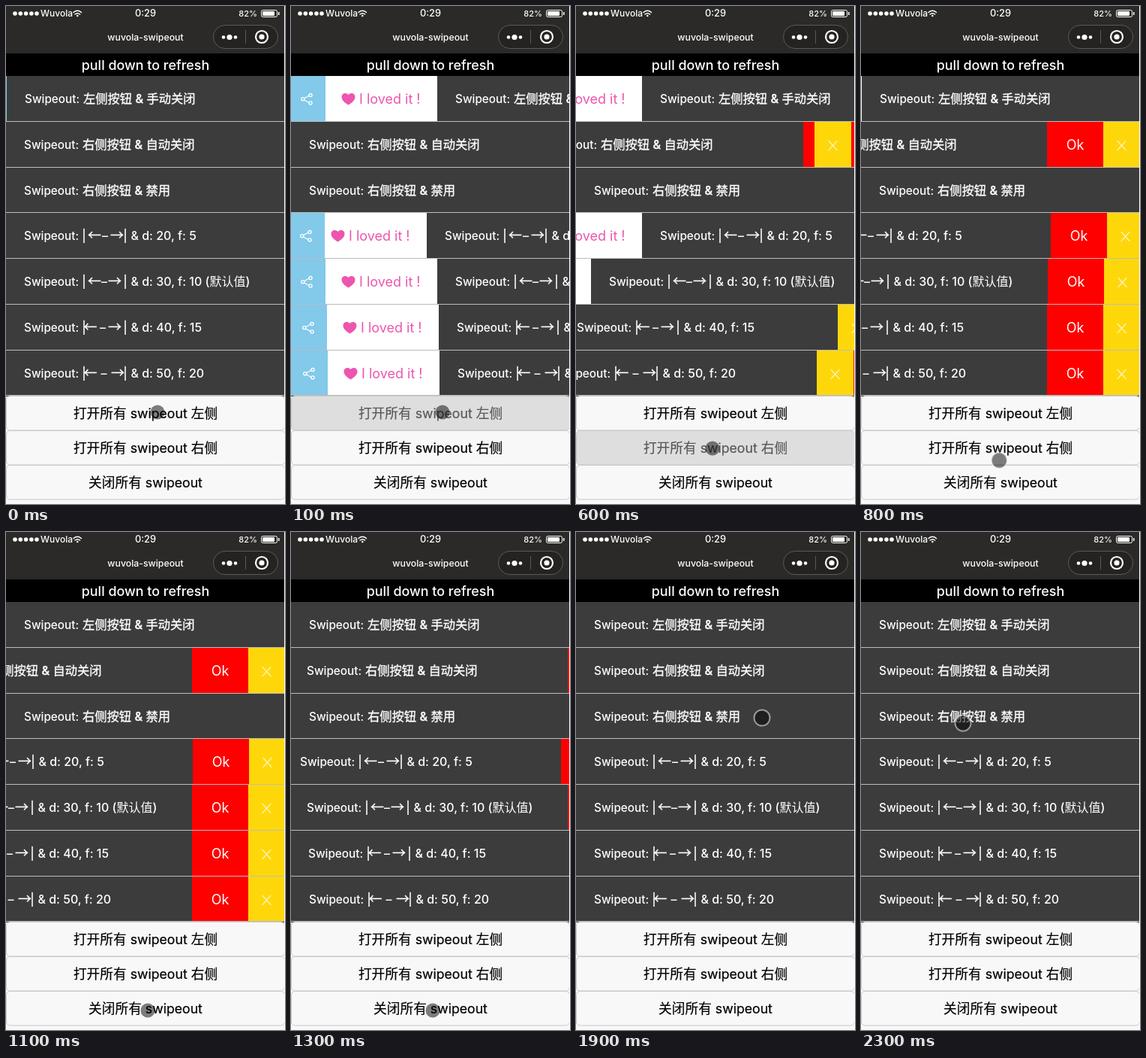
Recreate the animation shown at these times as an HTML page. Size 372 by 662 pixels, loop 2400 ms.

```html
<!DOCTYPE html>
<html lang="zh">
<head>
<meta charset="utf-8">
<title>swipeout</title>
<style>
html, body { margin: 0; width: 100%; height: 100%; overflow: hidden; background: #f8f8f8; }
svg { display: block; width: 372px; height: 662px; }
text { font-family: Inter, "Noto Sans CJK SC", "Noto Sans", sans-serif; white-space: pre; }
.mid { text-anchor: middle; }
.head text { fill: #fff; font-weight: 500; }
.row text { fill: #fff; font-size: 16px; font-weight: 500; }
.row .big { font-size: 18px; font-weight: 400; }
.row .han { font-size: 16.3px; stroke: #fff; stroke-width: .35; }
.row .arrow { font-family: "Noto Sans CJK SC", sans-serif; font-size: 18px; stroke: #fff; stroke-width: .3; }
.btn rect { fill: #f8f8f8; stroke: #c8c8c8; }
.btn text { font-size: 17.7px; stroke: #000; stroke-width: .2; }
.btn.down rect { fill: #dedede; }
.btn.down text { opacity: .6; }
</style>
</head>
<body>
<svg id="stage" viewBox="0 0 372 662"></svg>
<script>
const W = 372, H = 662, LOOP = 2400, STEP = 100;
const BLUE = 49, LOVED = 149.5, OK = 75, CROSS = 49;
const LEFT = BLUE + LOVED, RIGHT = OK + CROSS;

// Label after "Swipeout:", friction, which sides open; arrow rows give glyph centres.
const rows = [
  { label: '左侧按钮 & 手动关闭', f: 10, left: 1 },
  { label: '右侧按钮 & 自动关闭', f: 10, right: 1 },
  { label: '右侧按钮 & 禁用', f: 10 },
  { label: '& d: 20, f: 5', f: 5, left: 1, right: 1, marks: [118, 132, 148] },
  { label: '& d: 30, f: 10 (默认值)', f: 10, left: 1, right: 1, marks: [118, 131, 145] },
  { label: '& d: 40, f: 15', f: 15, left: 1, right: 1, marks: [112.5, 129, 145] },
  { label: '& d: 50, f: 20', f: 20, left: 1, right: 1, marks: [112.5, 130.5, 149] }
];
const buttons = ['打开所有 swipeout 左侧', '打开所有 swipeout 右侧', '关闭所有 swipeout'];
const pressedAt = [100, 600, 1200];
const starts = [-0.12, 586, 1205];

// time, x, y of the pointer
const path = [
  [0, 202, 540], [100, 202, 540], [300, 192, 560], [500, 182, 588], [700, 182, 588],
  [1000, 189, 636], [1400, 189, 636], [1700, 200, 262], [1900, 248, 247], [2300, 136, 254]
];

const rect = (x, y, w, h, fill, more = '') =>
  `<rect x="${x}" y="${y}" width="${w}" height="${h}" fill="${fill}" ${more}/>`;
const dot = (x, y, r, more = 'fill="#fff"') => `<circle cx="${x}" cy="${y}" r="${r}" ${more}/>`;
const text = (x, y, s, more = '') =>
  `<text x="${x}" y="${y}" ${more}>${s.replace(/&/g, '&amp;')}</text>`;
const line = (d, color, width) =>
  `<path d="${d}" fill="none" stroke="${color}" stroke-width="${width}" stroke-linecap="round"/>`;
const clamp = v => Math.max(0, Math.min(1, v));
const rowTop = i => Math.round(93 + 60.75 * i);

function header() {
  return rect(0, 0, W, 63, '#2b2a28') + rect(0, 63, W, 30, '#000') +
    [12, 19.3, 26.6, 33.9, 41].map(x => dot(x, 10, 2.8)).join('') +
    '<g class="head">' +
    text(46, 14, 'Wuvola', 'font-size="12"') +
    text(186, 14, '0:29', 'class="mid" font-size="12.8"') +
    text(335, 13.5, '82%', 'text-anchor="end" font-size="11"') +
    text(186, 45.5, 'wuvola-swipeout', 'class="mid" font-size="12.3"') +
    text(186, 84.5, 'pull down to refresh', 'class="mid" font-size="17.9"') + '</g>' +
    line('M90 8.5Q95.3 4 100.5 8.5M92 11Q95.3 8.3 98.6 11', '#fff', 1.5) + dot(95.3, 13, 1.3) +
    rect(340.5, 5.5, 21, 9, 'none', 'rx="2" stroke="#fff"') + rect(342, 7, 16, 6, '#fff', 'rx="1"') +
    rect(363, 8, 1.5, 4, '#fff') +
    rect(276.5, 25.5, 86, 31, '#242321', 'rx="15.5" stroke="#5a5957"') +
    line('M319.5 32.5V49.5', '#5a5957', 1) +
    dot(290, 41.5, 2.3) + dot(298, 41.5, 3.6) + dot(306, 41.5, 2.3) +
    dot(341, 41, 8, 'fill="none" stroke="#fff" stroke-width="2.2"') + dot(341, 41, 3.6);
}

function leftPanel() {
  const pink = '#ee55ae';
  return rect(-LOVED, 0, LOVED, 60, '#fff') +
    `<path d="M-118.5 38.5C-123 36-127.5 32-127.5 28C-127.5 22.5-121 21.5-118.5 25C-116 21.5-109.5 22.5-109.5 28C-109.5 32-114 36-118.5 38.5Z" fill="${pink}"/>` +
    text(-104, 36.5, 'I loved it !', `class="big" style="fill:${pink}"`) +
    `<g class="share">${rect(-BLUE, 0, BLUE, 60, '#82c9ea')}` +
    line('M-28.5 29.7L-22 26.2M-28.5 32L-22 35.5', '#fff', 1.3) +
    [[-30.3, 30.8], [-20, 25.6], [-20, 36]].map(([x, y]) =>
      dot(x, y, 2.1, 'fill="none" stroke="#fff" stroke-width="1.3"')).join('') + '</g>';
}

function rightPanel() {
  return rect(W, 0, OK, 60, '#fe0000') + text(W + OK / 2, 36.5, 'Ok', 'class="mid big"') +
    `<g class="cross">${rect(W, 0, CROSS, 60, '#fed70b')}` +
    line(`M${W + 19} 25.5l11 12m0-12l-11 12`, '#fff3c0', 1.2) + '</g>';
}

function row(r, i) {
  const marks = r.marks ? [104, ...r.marks, 159].map((x, k) =>
    text(x, 36, '|←–→|'[k], `class="mid${k % 2 ? ' arrow' : ''}"`)).join('') : '';
  return `<g transform="translate(0 ${rowTop(i)})">${rect(0, 0, W, 61, '#3c3c3c')}<g class="row">` +
    text(24, 36, 'Swipeout:', 'style="font-size:15.3px"') + marks +
    text(r.marks ? 166.5 : 102, 36, r.label, r.marks ? '' : 'class="han"') +
    (r.left ? leftPanel() : '') + (r.right ? rightPanel() : '') + '</g>' +
    rect(0, rowTop(i + 1) - rowTop(i) - 1, W, 1, '#bcbcbc') + '</g>';
}

const stage = document.getElementById('stage');
stage.innerHTML = rect(0, 0, W, H, '#f8f8f8') + rows.map(row).join('') + header() +
  buttons.map((s, i) => `<g class="btn">${rect(0.5, 518.5 + 46 * i, W - 1, 45.5, '', 'rx="5"')}` +
    text(186, 547.5 + 46 * i, s, 'class="mid"') + '</g>').join('') +
  rect(W - 1, 0, 1, H, '#fff') +
  dot(0, 0, 10, 'id="pointer" fill="rgba(0,0,0,.5)" stroke="rgba(255,255,255,.5)"');

const rowEls = [...stage.querySelectorAll('.row')];
const btnEls = [...stage.querySelectorAll('.btn')];
const pointer = document.getElementById('pointer');
const shift = (el, x) => el && el.setAttribute('transform', `translate(${Math.round(x)} 0)`);

// Share of a move done after the given time; higher friction settles sooner.
function settle(ms, f) {
  const u = Math.max(0, ms) * 0.07;
  return 1 - Math.exp(-0.09 * f * u / (1 + 0.00856 * f * u));
}

function pointerAt(t) {
  const i = path.findIndex(p => p[0] > t);
  if (i < 0) return path[path.length - 1].slice(1);
  const [a, b] = [path[i - 1], path[i]], k = (t - a[0]) / (b[0] - a[0]);
  return [1, 2].map(j => a[j] + (b[j] - a[j]) * k);
}

function draw(t) {
  const phase = t < starts[1] ? 0 : t < starts[2] ? 1 : 2;
  rows.forEach((r, i) => {
    const stops = [0, r.left ? LEFT : 0, r.right ? -RIGHT : 0, 0];
    const from = stops[phase], to = stops[phase + 1];
    // Rows set off one just after another.
    const x = from + (to - from) * settle(t - starts[phase] - i * 0.05, r.f);
    const el = rowEls[i];
    shift(el, x);
    // The outer button starts over its neighbour and slides out while opening.
    shift(el.querySelector('.share'), -LOVED * (phase ? 1 : clamp((x - 90) / 100)));
    shift(el.querySelector('.cross'), OK * (phase > 1 ? 1 : clamp((-x - 57) / 60)));
  });
  btnEls.forEach((el, i) => el.classList.toggle('down', t === pressedAt[i]));
  const [x, y] = pointerAt(t);
  const down = t < 200 || (t >= 500 && t < 700) || (t >= 1000 && t < 1400);
  const set = (k, v) => pointer.setAttribute(k, v);
  set('cx', x);
  set('cy', y);
  set('r', down ? 9.5 : 10.5);
  set('stroke-width', down ? 0 : 2);
}

const begin = performance.now();
function tick() {
  const t = (performance.now() - begin) % LOOP;
  draw(Math.floor(t / STEP) * STEP);
  requestAnimationFrame(tick);
}
tick();
</script>
</body>
</html>
```
